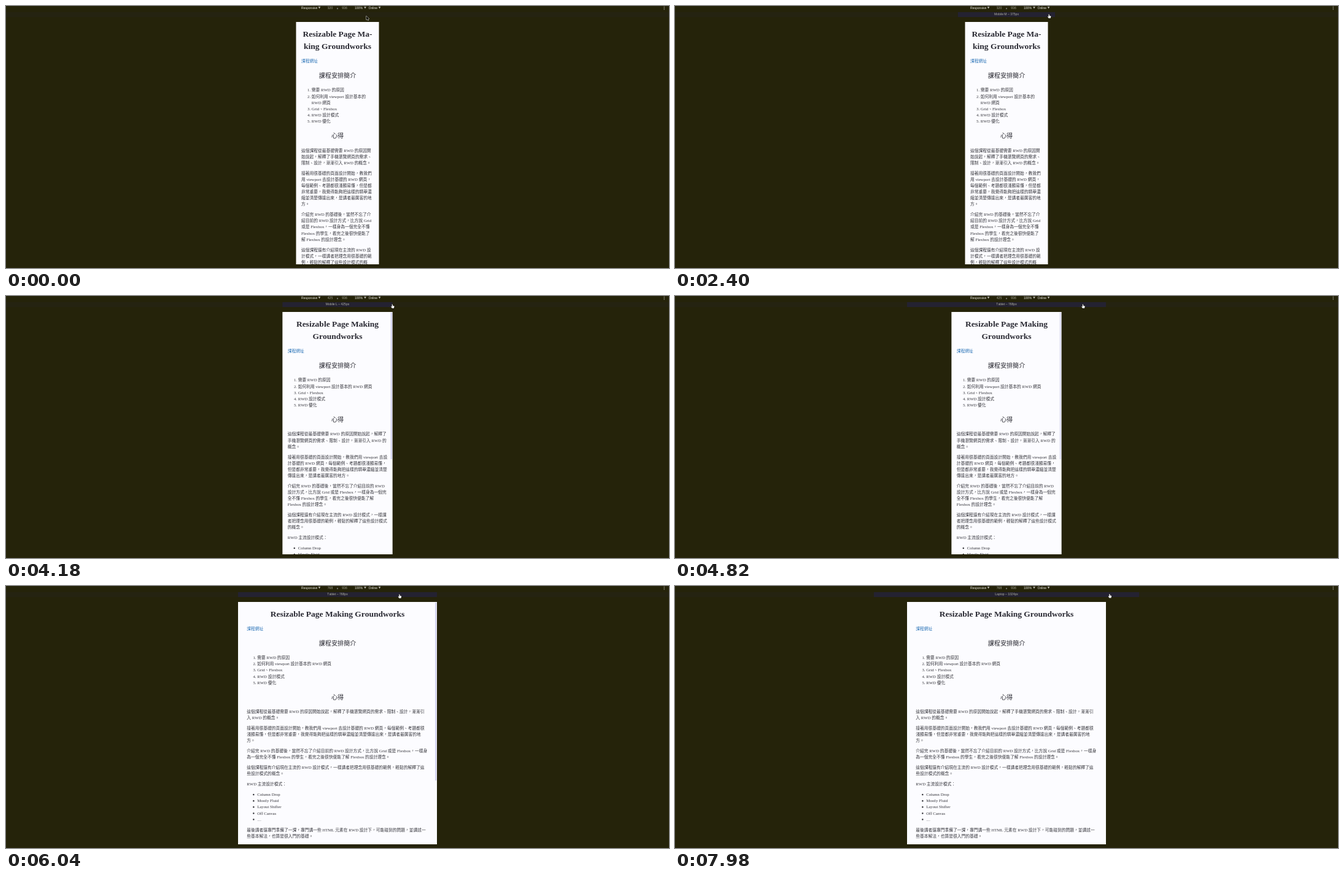
These frames come from a looping animation (1080x427 px, 8000 ms). An HTML page with a canvas:

```html
<!DOCTYPE html>
<html lang="zh-Hant">
<head>
<meta charset="utf-8">
<title>Responsive preview</title>
<style>
  html, body { margin: 0; width: 100%; height: 100%; overflow: hidden; background: #25230a; }
  canvas { display: block; width: 1080px; height: 427px; }
</style>
</head>
<body>
<canvas id="stage"></canvas>
<script>
const W = 1080, H = 427, LOOP = 8000;
const SCALE = 324 / 768;            // stage pixels per page pixel
const PAGE_TOP = 26, PAGE_BOTTOM = 421, MID = 540;
const SERIF = '"Liberation Serif", "Noto Sans CJK TC", "Noto Sans CJK", serif';
const SANS = '"Liberation Sans", Arial, sans-serif';

const canvas = document.getElementById('stage');
const dpr = window.devicePixelRatio || 1;
canvas.width = W * dpr;
canvas.height = H * dpr;
const ctx = canvas.getContext('2d');

const presets = [
  { name: 'Mobile S', width: 320 },
  { name: 'Mobile M', width: 375 },
  { name: 'Mobile L', width: 425 },
  { name: 'Tablet', width: 768 },
  { name: 'Laptop', width: 1024 }
];

// When each page width takes effect.
const resizes = [
  { at: 0, width: 320 },
  { at: 2440, width: 375 },
  { at: 4150, width: 425 },
  { at: 5700, width: 768 }
];

// Pointer tip: time, x, y.
const pointerPath = [
  [0, 587, 16], [250, 587, 16], [450, 592, 14], [800, 601, 13.5],
  [1600, 607.3, 13.5], [1750, 609.3, 13.5], [2400, 609.3, 13.5],
  [2480, 618, 13.5], [2620, 620, 13.5], [3200, 627, 13.5],
  [3420, 627.6, 13.5], [4180, 629.4, 13.5], [4450, 632, 13.5],
  [4700, 655, 13.5], [5080, 695, 13.5], [5450, 641, 13.5],
  [6600, 641, 13.5], [7380, 701, 13.2], [7650, 708, 13], [8000, 708, 13]
];

const styles = {
  h1: { size: 32, weight: 'bold', line: 48, margin: 21.4, color: '#2a2a33', center: true },
  h2: { size: 24, weight: 'normal', line: 36, margin: 26.3, color: '#2c2c34', center: true },
  p: { size: 16, weight: 'normal', line: 24, margin: 16, color: '#34343a' },
  link: { size: 16, weight: 'normal', line: 24, margin: 16, color: '#2b74b8' }
};

const blocks = [
  ['h1', 'Resizable Page Ma\u00adking Groundworks'],
  ['link', '課程網址'],
  ['h2', '課程安排簡介'],
  ['ol', ['需要 RWD 的原因', '如何利用 viewport 設計基本的 RWD 網頁', 'Grid、Flexbox', 'RWD 設計模式', 'RWD 優化']],
  ['h2', '心得'],
  ['p', '這個課程從最基礎需要 RWD 的原因開始說起，解釋了手機瀏覽網頁的需求、限制、設計，漸漸引入 RWD 的概念。'],
  ['p', '接著用很基礎的頁面設計開始，教我們用 view\u00adport 去設計基礎的 RWD 網頁，每個範例、考題都很淺顯易懂，但是都非常重要，我覺得能夠把這樣的精華濃縮並清楚傳達出來，是講者最厲害的地方。'],
  ['p', '介紹完 RWD 的基礎後，當然不忘了介紹目前的 RWD 設計方式，比方說 Grid 或是 Flexbox，一樣身為一個完全不懂 Flexbox 的學生，看完之後很快便能了解 Flexbox 的設計理念。'],
  ['p', '這個課程還有介紹現在主流的 RWD 設計模式，一樣講者把理念用很基礎的範例，輕鬆的解釋了這些設計模式的概念。'],
  ['p', 'RWD 主流設計模式：'],
  ['ul', ['Column Drop', 'Mostly Fluid', 'Layout Shifter', 'Off Canvas', '…']],
  ['p', '最後講者還專門準備了一課，專門講一些 HTML 元素在 RWD 設計下，可能碰到的問題，並講述一些基本解法，也算是很入門的基礎。']
];

const fontOf = (style, factor = 1) => `${style.weight} ${style.size * factor}px ${SERIF}`;

// Greedy wrap: CJK breaks anywhere except before punctuation, Latin at spaces or soft hyphens.
function wrap(text, style, maxWidth) {
  ctx.font = fontOf(style, 10);
  const measure = s => ctx.measureText(s).width / 10;
  const tokens = text.match(/\s*(?:[!-~…]+\u00ad?|[^\s])[，。、：]*/gu);
  const lines = [];
  let line = '', hyphen = false;
  for (const token of tokens) {
    const piece = token.replace('\u00ad', '');
    if (line && measure(line + piece) > maxWidth + 0.05) {
      lines.push(line + (hyphen ? '-' : ''));
      line = piece.trimStart();
    } else {
      line += piece;
    }
    hyphen = token.endsWith('\u00ad');
  }
  lines.push(line);
  return lines;
}

function layout(width) {
  const inner = Math.min(700, width - 40);
  const left = (width - inner) / 2;
  const rows = [];
  let y = 0, lastMargin = 0;

  const addLines = (text, style, indent, marker) => {
    wrap(text, style, inner - indent).forEach((line, i) => {
      rows.push({
        text: line, style, marker: i ? null : marker,
        x: style.center ? width / 2 : left + indent,
        y: y + style.line / 2 + style.size * 0.345
      });
      y += style.line;
    });
  };

  for (const [kind, content] of blocks) {
    const style = styles[kind] || styles.p;
    y += Math.max(lastMargin, style.margin);
    if (Array.isArray(content)) {
      content.forEach((item, i) => addLines(item, style, 40, kind === 'ol' ? `${i + 1}. ` : '•'));
    } else {
      addLines(content, style, 0);
    }
    lastMargin = style.margin;
  }
  return rows;
}

const layouts = {};

function drawPage(width, age) {
  const rows = layouts[width] || (layouts[width] = layout(width));
  const stageWidth = width * SCALE;
  const left = MID - stageWidth / 2;

  ctx.save();
  ctx.fillStyle = '#fcfcff';
  ctx.beginPath();
  ctx.rect(left, PAGE_TOP, stageWidth, PAGE_BOTTOM - PAGE_TOP);
  ctx.fill();
  ctx.clip();
  ctx.translate(left, PAGE_TOP);
  ctx.scale(SCALE, SCALE);
  ctx.textBaseline = 'alphabetic';
  for (const { text, style, marker, x, y } of rows) {
    ctx.font = fontOf(style);
    ctx.fillStyle = style.color;
    ctx.textAlign = style.center ? 'center' : 'left';
    ctx.fillText(text, x, y);
    if (marker === '•') {
      ctx.beginPath();
      ctx.arc(x - 14, y - 5, 2.9, 0, Math.PI * 2);
      ctx.fill();
    } else if (marker) {
      ctx.textAlign = 'right';
      ctx.fillText(marker, x, y);
    }
  }
  ctx.restore();

  const alpha = width === 320 ? 0 : Math.min(1, Math.max(0, (850 - age) / 250));
  if (alpha > 0) {
    ctx.globalAlpha = alpha;
    ctx.fillStyle = '#d2d2f0';
    ctx.fillRect(left + stageWidth - 3, PAGE_TOP + 1, 2.2, width === 768 ? 290 : 239);
    ctx.globalAlpha = 1;
  }
}

function label(text, x, y, color, align = 'left') {
  ctx.font = `5.06px ${SANS}`;
  ctx.textAlign = align;
  ctx.textBaseline = 'alphabetic';
  ctx.fillStyle = color;
  ctx.fillText(text, x, y);
}

function polygon(points) {
  ctx.beginPath();
  points.forEach(([x, y]) => ctx.lineTo(x, y));
  ctx.closePath();
}

function dropdown(text, x, arrowX) {
  label(text, x, 5, '#f0f0ea');
  polygon([[arrowX - 1.8, 1.3], [arrowX + 1.8, 1.3], [arrowX, 4.4]]);
  ctx.fillStyle = '#c4c4bc';
  ctx.fill();
}

function drawToolbar(width) {
  dropdown('Responsive', 481, 510.5);
  label(width, 528, 5, '#a6a698', 'center');
  label('×', 540, 5.6, '#c8c8d8', 'center');
  label('936', 551.5, 5, '#a6a698', 'center');
  dropdown('100%', 568, 585);
  dropdown('Online', 590.5, 608.5);
  ctx.fillStyle = '#b4b4ac';
  for (let i = 0; i < 3; i++) ctx.fillRect(1071.6, 1 + i * 2, 1.1, 1.1);
}

function drawPresetBar(preset) {
  const width = preset.width * SCALE;
  ctx.fillStyle = '#242231';
  ctx.fillRect(MID - width / 2, 10, width, 8);
  label(`${preset.name} – ${preset.width}px`, MID, 15.4, '#b0b0a4', 'center');
}

function drawPointer(x, y, isHand) {
  ctx.save();
  ctx.translate(x, y);
  ctx.lineJoin = 'round';
  if (isHand) {
    polygon([[-0.8, 0], [0.4, 0], [0.6, 2.2], [2.8, 2.7], [3.2, 3.6], [2.4, 6.6], [-0.6, 6.6], [-2.4, 3.8], [-1.8, 3.2], [-0.8, 4]]);
  } else {
    polygon([[0, 0], [0, 6.6], [1.5, 5.3], [2.5, 7.6], [3.5, 7.2], [2.5, 5], [4.5, 4.8]]);
  }
  ctx.strokeStyle = isHand ? '#14140c' : '#f4f4f4';
  ctx.fillStyle = isHand ? '#f6f6f6' : '#14140c';
  ctx.lineWidth = 0.9;
  ctx.stroke();
  ctx.fill();
  ctx.restore();
}

function pointerAt(t) {
  const i = pointerPath.findIndex(key => key[0] > t);
  const [t0, x0, y0] = pointerPath[i - 1];
  const [t1, x1, y1] = pointerPath[i];
  const u = (t - t0) / (t1 - t0);
  const ease = u * u * (3 - 2 * u);
  return [x0 + (x1 - x0) * ease, y0 + (y1 - y0) * ease];
}

function draw(t) {
  ctx.setTransform(dpr, 0, 0, dpr, 0, 0);
  ctx.fontKerning = 'none';
  ctx.fillStyle = '#25230a';
  ctx.fillRect(0, 0, W, H);
  ctx.fillStyle = '#252311';
  ctx.fillRect(0, 10, W, 8);

  const resize = resizes.filter(r => r.at <= t).pop();
  const [x, y] = pointerAt(t);
  const hovered = y < 15.3 && presets.find(p => Math.abs(x - MID) <= p.width * SCALE / 2);

  drawPage(resize.width, t - resize.at);
  drawToolbar(resize.width);
  if (hovered) drawPresetBar(hovered);
  drawPointer(x, y, Boolean(hovered));
}

const start = performance.now();
function tick() {
  draw((performance.now() - start) % LOOP);
  requestAnimationFrame(tick);
}
tick();
</script>
</body>
</html>
```
